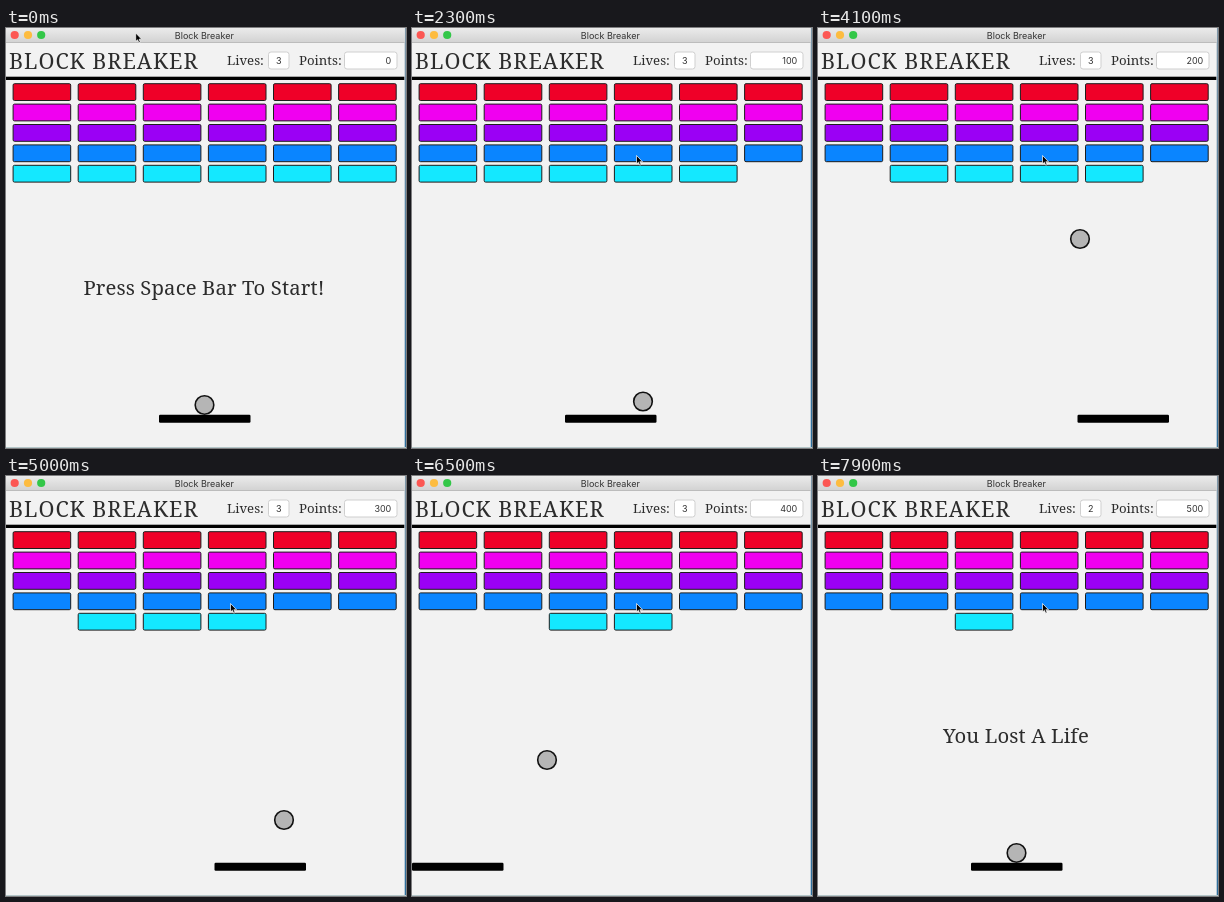
Animation of 400 by 420 pixels, one loop 8000 ms. Source, as an HTML page:

```html
<!DOCTYPE html>
<html lang="en">
<head>
<meta charset="utf-8">
<title>Block Breaker</title>
<style>
  html, body { margin: 0; width: 100%; height: 100%; overflow: hidden; }
  svg { display: block; }
  .slab { font-family: "Noto Serif", serif; fill: #2c2c2c; }
  .ui { font: 9px Inter, sans-serif; fill: #333; }
  .field { fill: #fff; stroke: #cfcfcf; }
  #title { font-size: 21.5px; letter-spacing: 1px; }
  #message { font-size: 20.3px; letter-spacing: .12px; font-weight: 500; }
  #blocks rect { stroke: #1c1c1c; }
</style>
</head>
<body>
<svg width="400" height="420" viewBox="0 0 400 420">
  <defs>
    <linearGradient id="bar" x2="0" y2="1">
      <stop stop-color="#ebebeb"/><stop offset="1" stop-color="#d3d3d3"/>
    </linearGradient>
    <linearGradient id="desk" x2="0" y2="1">
      <stop stop-color="#7f97a8"/><stop offset="1" stop-color="#2c6d9c"/>
    </linearGradient>
  </defs>
  <rect width="400" height="420" fill="url(#desk)"/>
  <rect y="419" width="400" height="1" fill="#b4c6c8"/>
  <rect width="398.7" height="419" fill="#f2f2f2"/>
  <rect width="398.7" height="14" fill="url(#bar)"/>
  <rect y="14" width="398.7" height="1" fill="#bcbcbc"/>
  <circle cx="8.7" cy="7" r="4.1" fill="#fc5753"/>
  <circle cx="22" cy="7" r="4.1" fill="#fdbc40"/>
  <circle cx="35.2" cy="7" r="4.1" fill="#33c748"/>
  <text class="ui" x="198.3" y="10.5" text-anchor="middle">Block Breaker</text>

  <text class="slab" id="title" x="3" y="40.5">BLOCK BREAKER</text>
  <text class="slab" x="221" y="37" font-size="13.2">Lives:</text>
  <text class="slab" x="293" y="37" font-size="13.2">Points:</text>
  <rect class="field" x="262.5" y="24" width="20.5" height="17" rx="2.5"/>
  <rect class="field" x="338.5" y="24" width="52.5" height="17" rx="2.5"/>
  <text class="ui" id="lives" x="272.7" y="36" text-anchor="middle"></text>
  <text class="ui" id="points" x="385.3" y="36" text-anchor="end"></text>
  <rect y="48.7" width="398.3" height="3.3"/>

  <g id="blocks"></g>
  <text class="slab" id="message" x="198" y="266.5" text-anchor="middle"></text>
  <rect id="paddle" y="386.7" width="91.5" height="8.1" rx="1.2"/>
  <circle id="ball" r="9.3" fill="#b5b5b5" stroke="#111" stroke-width="1.6"/>
  <path id="cursor" d="M0 0V8.5L1.9 6.8L3.2 9.7L4.6 9.1L3.4 6.2H6Z" stroke="#fff" stroke-width=".7"/>
</svg>
<script>
const LOOP = 8000, STEP = 100, LAUNCH = 975, LOST = 7700;
const LEFT = 10, RIGHT = 388, TOP = 165, FLOOR = 377;
const SPAN = RIGHT - LEFT, RISE = FLOOR - TOP;
const COLORS = ["#ef0028", "#f000f0", "#9b00f5", "#0a85ff", "#14e8ff"];
const HIT_COLUMNS = [5, 0, 4, 1, 3];

// Distance travelled along each axis, before folding at the walls: [time, across, up]
const TRAVEL = [
  [LAUNCH, 188.5, 0], [1400, 300, 133], [3200, 770, 722], [4100, 1008, 1014],
  [5000, 1244, 1305], [6500, 1637, 1789], [LOST, 1951.6, 2177.8]
];
const PADDLE = [
  [0, 153], [2700, 153], [2790, 125], [3680, 125], [4100, 259.5], [4850, 259.5],
  [5000, 208.5], [5450, 208.5], [6100, 0], [6885, 0], [7520, 203], [LOST, 203]
];

const $ = id => document.getElementById(id);
const set = (el, attrs) => { for (const k in attrs) el.setAttribute(k, attrs[k]); };

function track(keys, t, col = 1) {
  if (t <= keys[0][0]) return keys[0][col];
  for (let i = 1; i < keys.length; i++) {
    const a = keys[i - 1], b = keys[i];
    if (t <= b[0]) return a[col] + (b[col] - a[col]) * (t - a[0]) / (b[0] - a[0]);
  }
  return keys[keys.length - 1][col];
}

function fold(d, size) {
  const r = d % (2 * size);
  return r > size ? 2 * size - r : r;
}

const bottomRow = [];
COLORS.forEach((fill, row) => {
  for (let col = 0; col < 6; col++) {
    const block = document.createElementNS("http://www.w3.org/2000/svg", "rect");
    set(block, { x: 7.1 + 65.1 * col, y: 55.7 + 20.4 * row, width: 57.6, height: 16.8, rx: 1.4, fill });
    $("blocks").append(block);
    if (row === COLORS.length - 1) bottomRow[col] = block;
  }
});

function draw(t) {
  const lost = t >= LOST, idle = lost || t < LAUNCH;
  const across = track(TRAVEL, t, 1), up = track(TRAVEL, t, 2);
  const hits = Math.floor((up / RISE + 1) / 2);
  const missed = up - 10 * RISE;

  set($("ball"), idle ? { cx: 198.5, cy: FLOOR } : {
    cx: LEFT + fold(across, SPAN),
    cy: FLOOR + (missed > 0 ? missed : -fold(up, RISE))
  });
  set($("paddle"), { x: lost ? 153 : track(PADDLE, t) });

  const gone = HIT_COLUMNS.slice(0, hits);
  bottomRow.forEach((block, col) =>
    set(block, { visibility: gone.includes(col) ? "hidden" : "visible" }));
  $("points").textContent = Math.min(hits, 5) * 100;
  $("lives").textContent = lost ? 2 : 3;
  $("message").textContent = lost ? "You Lost A Life" : idle ? "Press Space Bar To Start!" : "";

  const p = Math.min(1, Math.max(0, (t - 50) / 750)), ease = p * p * (3 - 2 * p);
  set($("cursor"), { transform: `translate(${129.7 + 94.8 * ease} ${5 + 122.5 * ease})` });
}

const start = performance.now();
function tick() {
  const t = (performance.now() - start) % LOOP;
  draw(Math.floor(t / STEP) * STEP);
  requestAnimationFrame(tick);
}
tick();
</script>
</body>
</html>
```
